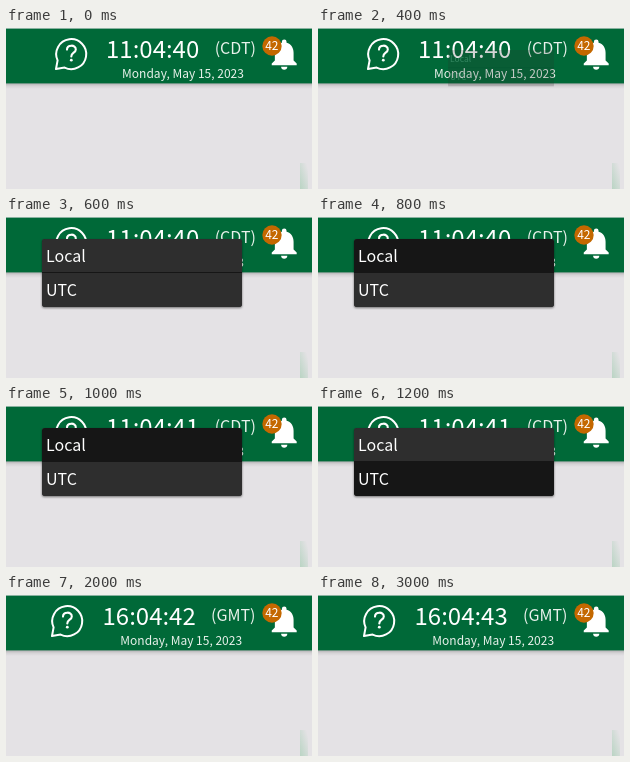
These frames come from a looping animation (306x161 px, 3.9 s). An HTML page:

```html
<!DOCTYPE html>
<html lang="en">
<head>
<meta charset="utf-8">
<title>Clock time zone menu</title>
<style>
  html, body { margin: 0; width: 100%; height: 100%; overflow: hidden; background: #e4e2e5; }
  svg { display: block; width: 306px; height: 161px; }
  text { font-family: "Noto Sans CJK JP", "Noto Sans CJK SC", "Noto Sans CJK", "Noto Sans", sans-serif; fill: #fff; white-space: pre; }
  #zone, #date { fill: #e9f2ec; }
</style>
</head>
<body>
<svg viewBox="0 0 306 161">
  <defs>
    <linearGradient id="shade" x2="0" y2="1">
      <stop stop-color="#000" stop-opacity=".24"/>
      <stop offset=".5" stop-color="#000" stop-opacity=".07"/>
      <stop offset="1" stop-color="#000" stop-opacity="0"/>
    </linearGradient>
    <linearGradient id="corner" x1="1" x2="0" y2="1">
      <stop offset=".1" stop-color="#e4e2e5"/>
      <stop offset="1" stop-color="#b9d4c3"/>
    </linearGradient>
    <filter id="drop" x="-10%" y="-10%" width="120%" height="130%">
      <feDropShadow dx="0" dy="1" stdDeviation="1" flood-opacity=".5"/>
    </filter>
  </defs>

  <rect width="306" height="161" fill="#e4e2e5"/>
  <rect x="294" y="135" width="8" height="26" fill="url(#corner)"/>
  <rect y="55" width="306" height="6" fill="url(#shade)"/>
  <rect y=".6" width="306" height="54.8" fill="#006938"/>

  <g id="help" fill="none" stroke="#fff" stroke-width="2" stroke-linejoin="round" stroke-linecap="round">
    <path d="M50 41L51.6 32.4A15 15 0 1 1 58.6 39.6Z"/>
    <path d="M61 21.6C61 16.4 69.8 16.4 69.8 21.4C69.8 24.6 65.3 24.8 65.3 28.4" stroke-width="2.1"/>
    <circle cx="65.3" cy="32.2" r="1.4" fill="#fff" stroke="none"/>
  </g>
  <text id="clock" y="29.5" font-size="24"></text>
  <text id="zone" y="26" font-size="16" text-anchor="end"></text>
  <text id="date" y="50" font-size="12">Monday, May 15, 2023</text>

  <path fill="#fff" transform="translate(259.5 7.5) scale(1.56)" d="M12 22c1.1 0 2-.9 2-2h-4c0 1.1.9 2 2 2zM18 16v-5c0-3.07-1.64-5.64-4.5-6.32V4a1.5 1.5 0 0 0-3 0v.68C7.63 5.36 6 7.92 6 11v5l-2 2v1h16v-1z"/>
  <circle cx="266" cy="18" r="9.7" fill="#c46800"/>
  <text x="265.8" y="22.4" font-size="12" text-anchor="middle">42</text>

  <g id="menu" filter="url(#drop)">
    <rect x="36" y="22" width="200" height="68" rx="3" fill="#2e2e2e"/>
    <path id="local" d="M36 56V25a3 3 0 0 1 3-3H233a3 3 0 0 1 3 3V56Z"/>
    <path id="utc" d="M36 56V87a3 3 0 0 0 3 3H233a3 3 0 0 0 3-3V56Z"/>
    <path d="M36 55.5H236" stroke="#151515"/>
    <text x="40" y="45" font-size="16">Local</text>
    <text x="40" y="79" font-size="16">UTC</text>
  </g>
</svg>
<script>
const LOOP = 3900;
const el = id => document.getElementById(id);
const set = (id, attrs) => {
  for (const name in attrs) el(id).setAttribute(name, attrs[name]);
};

function draw(t) {
  const gmt = t >= 1800;
  const seconds = 40 + (t >= 1000) + (t >= 2000) + (t >= 3000);
  el('clock').textContent = `${t >= 2000 ? 16 : 11}:04:${seconds}`;
  el('zone').textContent = gmt ? '(GMT)' : '(CDT)';
  set('clock', { x: gmt ? 96.5 : 100 });
  set('zone', { x: gmt ? 249.5 : 249.9 });
  set('date', { x: gmt ? 114.3 : 116.1 });
  set('help', { transform: `translate(${gmt ? -4 : 0} 0)` });

  // The menu opens in hard steps from its top right corner.
  const [scale, opacity] = t < 500 ? [0.53, 0.2] : t < 600 ? [0.64, 0.75] : [1, 1];
  set('menu', {
    visibility: t >= 400 && !gmt ? 'visible' : 'hidden',
    opacity,
    transform: `translate(236 22) scale(${scale}) translate(-236 -22)`
  });
  set('local', { fill: t >= 800 && t < 1200 ? '#181918' : '#2d2e2d' });
  set('utc', { fill: t >= 1200 ? '#171717' : '#2e2e2e' });
}

const start = performance.now();
function tick() {
  draw((performance.now() - start) % LOOP);
  requestAnimationFrame(tick);
}
tick();
</script>
</body>
</html>
```
